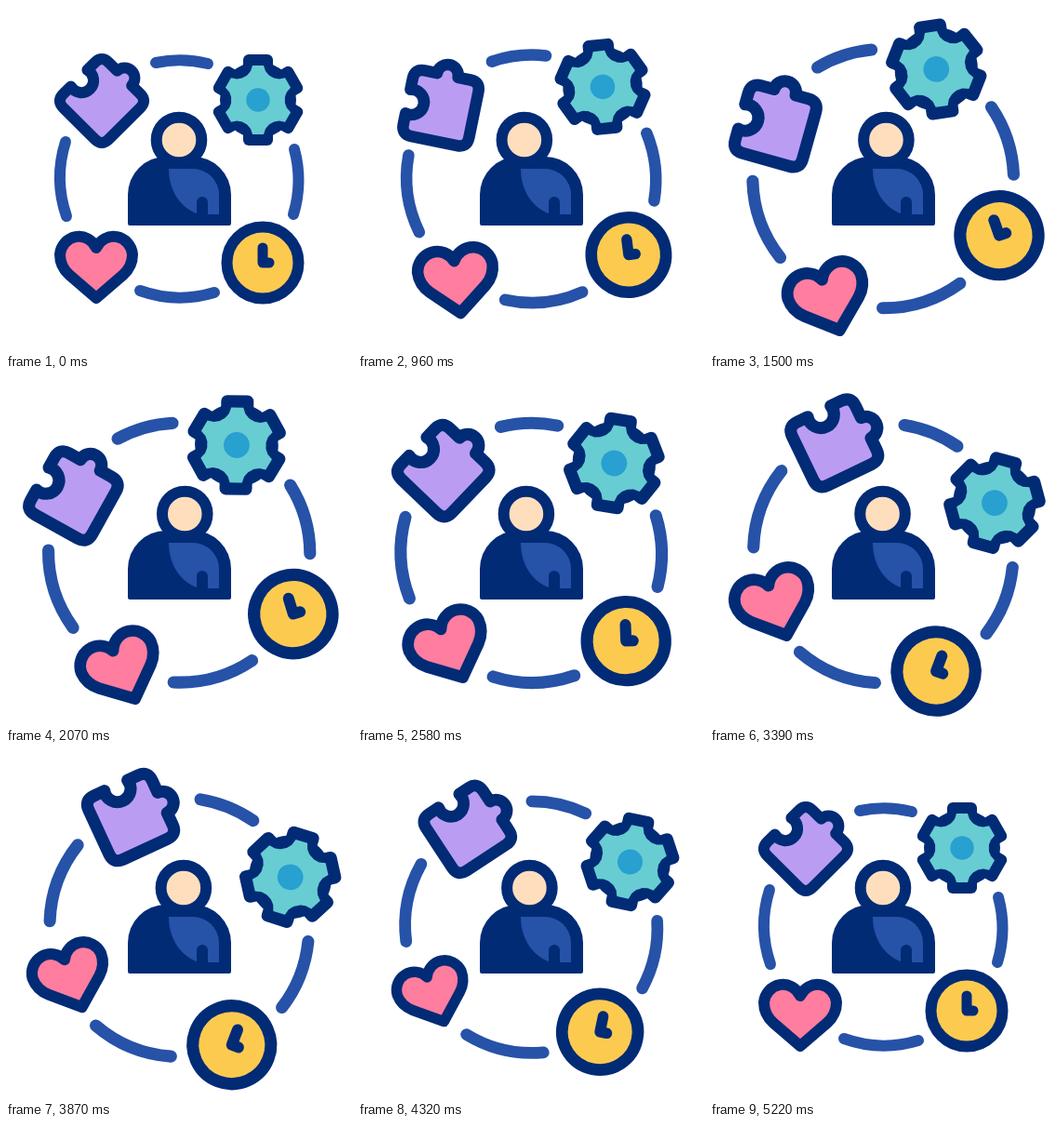
An HTML page without scripts for the animation above (5400 ms loop, 372 by 372 pixels).

```html
<!DOCTYPE html>
<html lang="en">
<head>
<meta charset="utf-8">
<title>Personal balance</title>
<style>
  html, body { margin: 0; width: 100%; height: 100%; overflow: hidden; background: #fff; }
  svg { display: block; width: 100vw; height: 100vh; }

  .outline { stroke: #022b76; stroke-width: 12; stroke-linejoin: round; stroke-linecap: round; }
  .arcs { fill: none; stroke: #2652a8; stroke-width: 12; stroke-linecap: round; }
  .navy { fill: #022b76; }
  .teal { fill: #67cdd2; }

  .ring, .puzzle, .gear, .heart, .head {
    animation: 5400ms cubic-bezier(.37, 0, .63, 1) infinite;
  }
  .ring { transform-origin: 186px 186px; animation-name: swing, grow; }
  .puzzle { transform-origin: 103px 102px; animation-name: rock; }
  .gear { transform-origin: 271px 101px; animation-name: turn; }
  .heart { transform-origin: 89px 264px; animation-name: tilt, shrink; }
  .head { animation-name: sway; }

  @keyframes swing {
    0%, 6.11% { rotate: 0deg; animation-timing-function: cubic-bezier(.5, 0, .6, 1); }
    31.9% { rotate: -20.3deg; }
    67.04% { rotate: 22.3deg; animation-timing-function: cubic-bezier(.37, 0, .5, 1); }
    96.67%, 100% { rotate: 0deg; }
  }
  @keyframes grow {
    0%, 6.11% { scale: 1; }
    30.4%, 68.5% { scale: 1.094; }
    96.67%, 100% { scale: 1; }
  }
  @keyframes rock {
    0%, 6.11% { rotate: 0deg; }
    18.5% { rotate: -26.5deg; }
    35.2%, 48% { rotate: 1deg; }
    63% { rotate: -1.5deg; }
    80%, 100% { rotate: 0deg; }
  }
  @keyframes turn {
    0%, 14% { rotate: 0deg; }
    38.5% { rotate: 18deg; }
    64% { rotate: -6deg; }
    81%, 100% { rotate: 0deg; }
  }
  @keyframes tilt {
    0%, 27% { rotate: 0deg; }
    67.04% { rotate: -42deg; animation-timing-function: cubic-bezier(.66, 0, .6, 1); }
    96.67%, 100% { rotate: 0deg; }
  }
  @keyframes shrink {
    0%, 12% { scale: 1; }
    38%, 62% { scale: .96; }
    80% { scale: .89; }
    96.67%, 100% { scale: 1; }
  }
  @keyframes sway {
    0%, 6.11% { translate: 0; }
    16.7% { translate: -7.3px; }
    34.3% { translate: 8px; }
    53.1% { translate: -8px; }
    70.7% { translate: 5px; }
    84.3% { translate: -3.5px; }
    96.67%, 100% { translate: 0; }
  }
</style>
</head>
<body>
<svg viewBox="0 0 372 372">
  <defs>
    <g id="teeth">
      <rect id="bar" x="-16" y="-49" width="32" height="98" rx="6"/>
      <use href="#bar" transform="rotate(60)"/>
      <use href="#bar" transform="rotate(120)"/>
      <circle r="41"/>
    </g>
    <g id="core">
      <path id="spoke" d="M-6-37H6L8-31L13-25V25L8 31L6 37H-6L-8 31L-13 25V-25L-8-31Z"/>
      <use href="#spoke" transform="rotate(60)"/>
      <use href="#spoke" transform="rotate(120)"/>
      <circle r="29"/>
    </g>
  </defs>

  <g class="ring">
    <path class="arcs" d="M161 61A127.5 127.5 0 0 1 217 62M310 154A127.5 127.5 0 0 1 309 224
      M224 308A127.5 127.5 0 0 1 144 306M65 226A127.5 127.5 0 0 1 64 146"/>

    <g class="puzzle">
      <path class="outline" fill="#ba9df3" transform="translate(103 102) rotate(45)"
        d="M-24-34.5H-11A11 11 0 0 1 11-34.5H24Q34.5-34.5 34.5-24V24Q34.5 34.5 24 34.5H-24Q-34.5 34.5-34.5 24V12.5
          A13 13 0 1 0-34.5-12.5V-24Q-34.5-34.5-24-34.5Z"/>
    </g>

    <g class="gear">
      <g transform="translate(271 101)">
        <use href="#teeth" class="navy"/>
        <use href="#core" class="teal"/>
        <circle r="12.7" fill="#28a0d0"/>
      </g>
    </g>

    <g class="heart">
      <path class="outline" fill="#ff7d9f"
        d="M97 314L68 289Q58 280 58 267A20.5 21 0 0 1 97 260A20.5 21 0 0 1 136 267Q136 280 126 289Z"/>
    </g>

    <circle class="outline" cx="276" cy="276" r="38.5" fill="#fdca50"/>
    <path class="outline" fill="none" d="M276 260V276H283" style="stroke-width:11"/>
  </g>

  <path class="navy" d="M131 234V203A41 41 0 0 1 172 162H201A41 41 0 0 1 242 203V234Q242 236 240 236H133Q131 236 131 234Z"/>
  <path fill="#2652a8" d="M175 175C175 200 189 217 205 223V211A6 6 0 0 1 217 211V224H229V203A28 28 0 0 0 201 175Z"/>
  <circle class="head outline" cx="186" cy="144" r="24.3" fill="#fedebd"/>
</svg>
</body>
</html>
```
